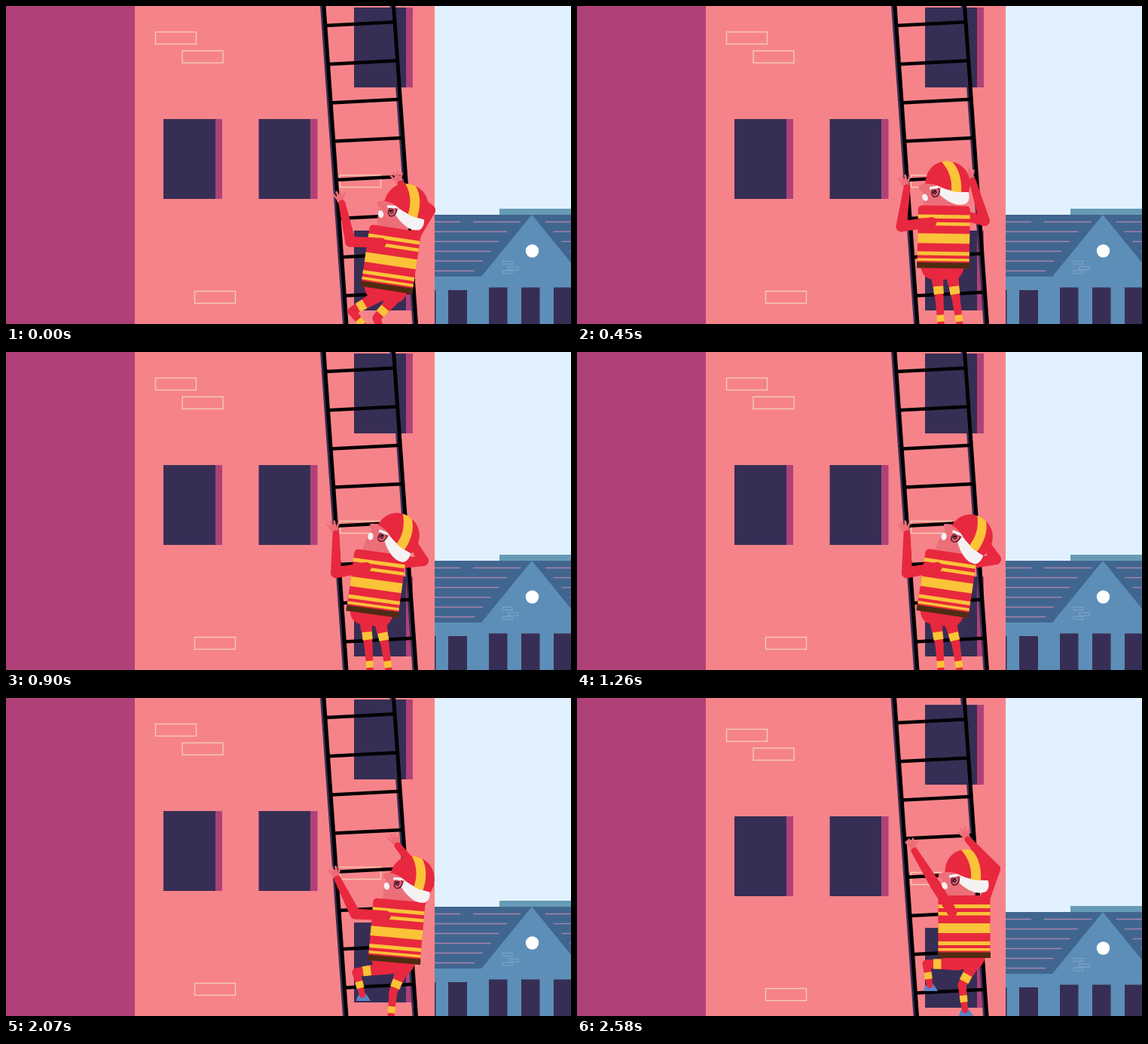
An HTML page with a canvas that plays this animation: 750x422 px, repeating every 2.61 s.

```html
<!DOCTYPE html>
<html lang="en">
<head>
<meta charset="utf-8">
<title>Firefighter on a ladder</title>
<style>
html, body { margin: 0; width: 100%; height: 100%; overflow: hidden; }
canvas { display: block; }
</style>
</head>
<body>
<canvas id="stage" width="750" height="422"></canvas>
<script>
const ctx = document.getElementById('stage').getContext('2d');
const LOOP = 2610, STEP = 30;
const RED = '#e8283e', YELLOW = '#fbc338', SKIN = '#ec6e79', WHITE = '#f5f2f3';
const NAVY = '#372e55', PLUM = '#b04178', BLUE = '#5d8eb7';

// Pose tracks, one value per key time
const TIMES = [60, 450, 900, 1260, 1710, 2070, 2580];
const BODY = [
  [505, 486, 486, 485, 486, 515, 514],
  [377, 348, 348, 348, 348, 351, 345],
  [8.5, 1, 7.8, 8.5, 5.5, 5, 0]
];
const HEAD = [
  [531, 492, 519, 522, 516, 539, 518],
  [266, 236, 244, 246, 243, 240, 231],
  [14, 0, 30, 33, 28, 15, 0]
];
const LEFT_WRIST = [
  [446, 438, 438, 438, 438, 440, 448],
  [262, 241, 241, 241, 241, 240, 203]
];
const RIGHT_ELBOW = [
  [563, 541, 554, 556, 550, 561, 555],
  [271, 285, 277, 275, 279, 247, 227]
];
const RIGHT_WRIST = [
  [524, 525, 527, 527, 526, 520, 519],
  [236, 232, 232, 232, 232, 196, 188]
];
// Leg stances: start, standing, stepping, pushing up
const STANCE = [0, 1, 1, 1, 1, 2, 3];
const legTrack = rows => rows.map(row => STANCE.map(i => row[i]));
const LEFT_KNEE = legTrack([[459, 481, 465, 464], [405, 388, 364, 353]]);
const LEFT_ANKLE = legTrack([[480, 484, 473, 468], [431, 436, 394, 381]]);
const RIGHT_KNEE = legTrack([[492, 503, 514, 511], [414, 388, 390, 381]]);
const RIGHT_ANKLE = legTrack([[500, 510, 510, 515], [440, 436, 433, 414]]);

const clamp = (v, a, b) => Math.min(b, Math.max(a, v));
const mix = (a, b, k) => a + (b - a) * k;
const between = (a, b, k) => [mix(a[0], b[0], k), mix(a[1], b[1], k)];

// Monotone cubic interpolation through the key poses
function valueAt(row, t) {
  t = clamp(t, TIMES[0], TIMES[6]);
  let i = 0;
  while (i < 5 && t > TIMES[i + 1]) i++;
  const slope = j => (row[j + 1] - row[j]) / (TIMES[j + 1] - TIMES[j]);
  const tangent = j => {
    if (j === 0 || j === 6) return slope(j ? 5 : 0);
    const a = slope(j - 1), b = slope(j);
    return a * b > 0 ? 2 * a * b / (a + b) : 0;
  };
  const h = TIMES[i + 1] - TIMES[i], k = (t - TIMES[i]) / h;
  const ease = k * k * (3 - 2 * k);
  return mix(row[i], row[i + 1], ease)
    + h * k * (1 - k) * ((1 - k) * tangent(i) - k * tangent(i + 1));
}
const pose = (track, t) => track.map(row => valueAt(row, t));

function rect(x, y, w, h, color) {
  ctx.fillStyle = color;
  ctx.fillRect(x, y, w, h);
}
function line(x1, y1, x2, y2, width, color) {
  ctx.lineWidth = width;
  ctx.strokeStyle = color;
  ctx.beginPath();
  ctx.moveTo(x1, y1);
  ctx.lineTo(x2, y2);
  ctx.stroke();
}
function outline(x, y, w, h, color, width) {
  ctx.lineWidth = width;
  ctx.strokeStyle = color;
  ctx.strokeRect(x, y, w, h);
}
function shape(path, color) {
  ctx.fillStyle = color;
  ctx.fill(new Path2D(path));
}
function ellipse(x, y, rx, ry, turn, color) {
  ctx.fillStyle = color;
  ctx.beginPath();
  ctx.ellipse(x, y, rx, ry, turn, 0, 7);
  ctx.fill();
}
function placed([x, y, degrees], draw) {
  ctx.save();
  ctx.translate(x, y);
  ctx.rotate(degrees * Math.PI / 180);
  draw();
  ctx.restore();
}
function taper(a, b, wa, wb, color) {
  const turn = Math.atan2(b[1] - a[1], b[0] - a[0]), q = Math.PI / 2;
  ctx.fillStyle = color;
  ctx.beginPath();
  ctx.arc(a[0], a[1], wa / 2, turn + q, turn + 3 * q);
  ctx.arc(b[0], b[1], wb / 2, turn - q, turn + q);
  ctx.fill();
}

function drawWindow(x, y) {
  rect(x, y, 69, 106, NAVY);
  rect(x + 69, y, 9, 106, PLUM);
}
function drawHouse() {
  rect(655, 269, 95, 9, '#669bb6');
  rect(569, 277, 181, 83, '#40668f');
  for (let i = 0; i < 6; i++) {
    const y = 286.5 + i * 13, half = 14 + i * 10.8;
    line(569, y, i ? 690 - half : 603, y, 1.3, '#a983ad');
    if (!i) line(620, y, 683, y, 1.3, '#a983ad');
    line(702 + half, y, 750, y, 1.3, '#a983ad');
  }
  shape('M698 277L631 359H765Z', BLUE);
  rect(569, 359, 181, 63, BLUE);
  ellipse(698.5, 325, 8.7, 8.7, 0, '#fff');
  for (const [x, y] of [[659, 338.5], [667, 346], [659, 351]]) outline(x, y, 13, 4, '#8daccd', 0.8);
  rect(569, 377, 1.5, 50, NAVY);
  rect(587, 377, 25, 50, NAVY);
  for (const x of [641, 684, 727]) rect(x, 373.5, 24.5, 50, NAVY);
}
function drawLadder() {
  const rail = (x, w, color) => line(x - 2.1, -30, x + 30, 422, w, color);
  for (const x of [422, 514.5]) {
    rail(x - 3, 4, NAVY);
    rail(x, 5, '#000');
  }
  for (let i = -1; i < 9; i++) {
    const y = 26 + i * 51.2, x = 424 + i * 3.64;
    line(x, y, x + 92, y - 4.7, 4.5, '#000');
  }
}
function drawScene(scroll) {
  rect(0, 0, 171, 422, PLUM);
  rect(171, 0, 398, 422, '#f6838a');
  rect(569, 0, 181, 422, '#e1f1ff');
  ctx.save();
  ctx.translate(0, scroll);
  drawWindow(209, 150);
  drawWindow(335.5, 150);
  drawWindow(462, 2);
  drawWindow(462, 298);
  for (const [x, y] of [[198.5, 34.5], [234, 59.5], [250.5, 378.5], [443.5, 224.5]]) {
    outline(x, y, 54, 16, '#f3cdb3', 1.4);
  }
  drawHouse();
  drawLadder();
  ctx.restore();
}

function drawLeg(hip, knee, ankle) {
  placed([...ankle, 0], () => shape('M-8 8C-7 2 -4 -3 1 -3C5 -3 8 3 11 8Z', '#5b83c6'));
  taper(hip, knee, 17, 11, RED);
  taper(knee, ankle, 11, 8, RED);
  const band = (a, b, k, half, width) => {
    const [x, y] = between(a, b, k), length = Math.hypot(b[0] - a[0], b[1] - a[1]);
    const dx = (b[0] - a[0]) / length * half, dy = (b[1] - a[1]) / length * half;
    line(x - dx, y - dy, x + dx, y + dy, width, YELLOW);
  };
  band(hip, knee, 0.66, 5.2, 13.2);
  band(knee, ankle, 0.55, 4.5, 10);
}
function drawHand(wrist, turn) {
  placed([...wrist, turn], () => {
    ellipse(0, -6, 5, 7, 0, SKIN);
    ctx.lineCap = 'round';
    for (const x of [-4, -0.8, 2.6]) line(x, -9, x * 1.5, -17 + Math.abs(x) / 2, 2.8, SKIN);
    line(3, -6, 8, -11, 2.8, SKIN);
    ctx.lineCap = 'butt';
  });
}
function drawArm(shoulder, elbow, wrist, handTurn) {
  drawHand(wrist, handTurn);
  taper(shoulder, elbow, 13, 14, RED);
  taper(elbow, wrist, 14, 9, RED);
}
// Elbow of a two-bone arm, bent toward the lower left
function bend(shoulder, wrist, upper, lower) {
  const dx = wrist[0] - shoulder[0], dy = wrist[1] - shoulder[1], d = Math.hypot(dx, dy);
  const along = (upper * upper - lower * lower + d * d) / (2 * d);
  const out = Math.sqrt(Math.max(0, upper * upper - along * along));
  return [shoulder[0] + (dx * along + dy * out) / d, shoulder[1] + (dy * along - dx * out) / d];
}
function drawTorso() {
  ctx.fillStyle = RED;
  ctx.beginPath();
  ctx.roundRect(-34.5, -83, 69, 83, [5, 5, 0, 0]);
  ctx.fill();
  for (const [y, h] of [[-71, 5], [-61, 4.5], [-46, 13], [-22, 5], [-13, 3.5]]) {
    rect(-34.5, y, 69, h, YELLOW);
  }
  rect(-35, -7.5, 70, 7.5, '#4f2b12');
}
function drawHead() {
  shape('M-9 5L27 9Q31 20 25 26Q15 30 5 25Q-4 21 -11 14Z', WHITE);
  ellipse(-16, 11, 5, 6.5, 0.3, '#e65e70');
  ctx.lineWidth = 1.4;
  ctx.strokeStyle = '#4a1c2c';
  ctx.stroke();
  ellipse(-17, 11, 2.6, 3.4, 0.6, '#351626');
  line(-19, 14, -13, 8, 1, '#e65e70');
  line(-24, 6, -8, 3, 3.5, WHITE);
  ellipse(-30, 18, 3.6, 5, -0.4, WHITE);
  shape('M-29.5 0C-29 -19 -17 -30 -1 -30C18 -30 30 -16 30 2L28 11Q6 12 -12 3Q-20 -1 -29.5 0Z', RED);
  shape('M-8 -29.3C3 -17 6 -4 5 9.5Q12 11.5 18 11C19 -6 15 -20 6 -29.2Q-1 -31 -8 -29.3Z', YELLOW);
}
function drawFirefighter(t) {
  const body = pose(BODY, t), head = pose(HEAD, t);
  const angle = body[2] * Math.PI / 180, c = Math.cos(angle), s = Math.sin(angle);
  const joint = (x, y) => [body[0] + x * c - y * s, body[1] + x * s + y * c];
  const leftShoulder = joint(-16, -61), leftWrist = pose(LEFT_WRIST, t);

  drawLeg(joint(12, 8), pose(RIGHT_KNEE, t), pose(RIGHT_ANKLE, t));
  drawLeg(joint(-8, 8), pose(LEFT_KNEE, t), pose(LEFT_ANKLE, t));
  placed(body, () => shape('M-30 -2Q-27 14 -14 15H14Q25 13 28 -2Z', RED));
  drawArm(joint(25, -71), pose(RIGHT_ELBOW, t), pose(RIGHT_WRIST, t), -30);
  placed(head, () => shape('M-28 -2L-38 3Q-40 7 -33 10L-33 22L-30 42L8 42L14 8Z', SKIN));
  placed(body, drawTorso);
  drawArm(leftShoulder, bend(leftShoulder, leftWrist, 41, 52), leftWrist, -22);
  placed(head, drawHead);
}

function render(now) {
  const t = Math.floor(now % LOOP / STEP) * STEP;
  drawScene(7 * clamp((t - 2250) / 330, 0, 1) ** 2);
  drawFirefighter(t);
  requestAnimationFrame(render);
}
render(0);
</script>
</body>
</html>
```
